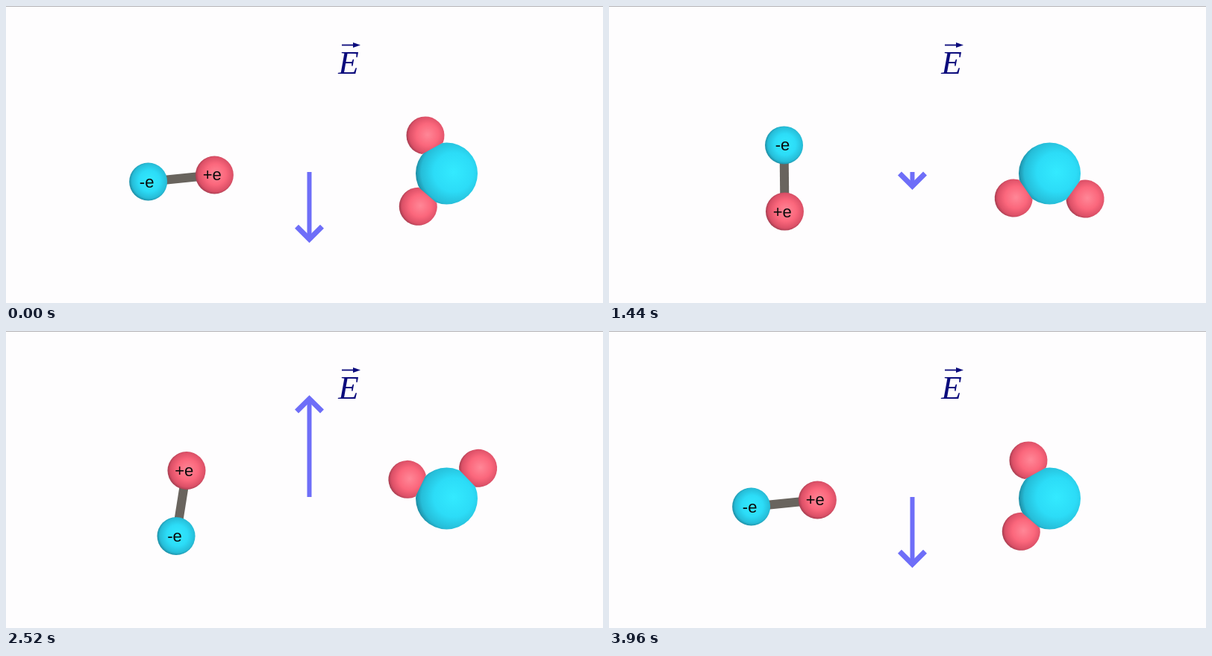
Write an HTML page with a canvas that moves like this. It is 800x399 px and loops after 4000 ms.

```html
<!DOCTYPE html>
<html lang="en">
<head>
<meta charset="utf-8">
<title>Dipoles in an alternating field</title>
<style>
  html, body { margin: 0; width: 100%; height: 100%; overflow: hidden; background: #fefdfe; }
  canvas { display: block; }
</style>
</head>
<body>
<canvas id="stage" width="800" height="399"></canvas>
<script>
const ctx = document.getElementById('stage').getContext('2d');
const LOOP = 4000, STEP = 40, HALF = 1980;   // the field reverses every HALF ms
const RAD = Math.PI / 180;

const BLUE = ['#33eaff', '#2cdcf7', '#26bdd8', '#1b7f95'];
const RED = ['#ff8797', '#fb677c', '#dc5067', '#96384a'];

// Dipole angle in degrees over half a cycle; the other half is its negative.
const swing = [[0, -5.8], [100, 17.2], [260, 51], [540, 81], [680, 85],
               [1000, 88.3], [1300, 89.8], [1440, 89.4], [1680, 66], [1940, 14.5]];
const shifted = ([t, a], by) => [t + by, -a];
const knots = [shifted(swing[swing.length - 1], -HALF), ...swing,
               shifted(swing[0], HALF), shifted(swing[1], HALF)];

function slope(i) {
  const [a, b, c] = [knots[i - 1], knots[i], knots[i + 1]];
  const h1 = b[0] - a[0], h2 = c[0] - b[0];
  return (h2 * (b[1] - a[1]) / h1 + h1 * (c[1] - b[1]) / h2) / (h1 + h2);
}

function dipoleAngle(t) {
  const phase = t % HALF;
  let i = 1;
  while (knots[i + 1][0] <= phase) i++;
  const [t0, a0] = knots[i], [t1, a1] = knots[i + 1];
  const h = t1 - t0, u = (phase - t0) / h, v = 1 - u;
  const angle = a0 * v * v * (1 + 2 * u) + a1 * u * u * (3 - 2 * u)
    + h * u * v * (slope(i) * v - slope(i + 1) * u);
  return (t % (2 * HALF) < HALF ? angle : -angle) * RAD;
}

// A sphere lit from an offset point; "from" and "to" cut off a cap.
function sphere(x, y, r, colors, light, from = 0, to = 2 * Math.PI) {
  const lx = x + light * r, ly = y - 0.04 * r;
  const shade = ctx.createRadialGradient(lx, ly, 0, lx, ly, r * (1.05 + light));
  [0, 0.5, 0.82, 1].forEach((stop, i) => shade.addColorStop(stop, colors[i]));
  ctx.fillStyle = shade;
  ctx.beginPath();
  ctx.arc(x, y, r, from, to);
  ctx.fill();
}

function line(color, width, ...points) {
  ctx.strokeStyle = color;
  ctx.lineWidth = width;
  ctx.beginPath();
  points.forEach(([x, y]) => ctx.lineTo(x, y));
  ctx.stroke();
}

function label(text, x, y, font, color) {
  ctx.font = font;
  ctx.fillStyle = color;
  ctx.textAlign = 'center';
  ctx.fillText(text, x, y);
}

function drawDipole(angle) {
  const x = 235, y = 231.5;
  const dx = 44.6 * Math.cos(angle), dy = 44.6 * Math.sin(angle);
  const font = '22px "Liberation Sans", Arial, sans-serif';
  line('#69645e', 12, [x - dx, y - dy], [x + dx, y + dy]);
  sphere(x - dx, y - dy, 25.5, BLUE, 0.06);
  sphere(x + dx, y + dy, 25.5, RED, 0.06);
  label('-e', x - dx - 2, y - dy + 7.5, font, '#0a0a0a');
  label('+e', x + dx - 3.2, y + dy + 7.5, font, '#0a0a0a');
}

function drawWater(angle) {
  const x = 590.5, y = 225, reach = 58.5, cap = 141 * RAD;
  sphere(x, y, 41.5, BLUE, 0.22);
  for (const side of [-55, 55]) {
    const a = Math.PI - angle + side * RAD;
    sphere(x + reach * Math.cos(a), y + reach * Math.sin(a), 25.5, RED, 0.12, a - cap, a + cap);
  }
}

function drawField(t) {
  const x = 406.5, y = 223, color = '#6e6ef8';
  const field = Math.cos((t - 518) * Math.PI / HALF);
  const dir = Math.sign(field) || 1;
  const tip = Math.max(131 * Math.abs(field) + 6, 24) - 5;
  const at = (dx, d) => [x + dx, y + dir * d];
  line(color, 6, at(0, 0), at(0, tip));
  line(color, 7, at(-17, tip - 17), at(0, tip), at(17, tip - 17));
}

function drawSymbol() {
  const navy = '#0b0b7c';
  label('E', 459, 91, 'italic 45px "Liberation Serif", "Times New Roman", serif', navy);
  line(navy, 1.8, [450, 52.5], [468, 52.5]);
  ctx.fillStyle = navy;
  ctx.beginPath();
  ctx.moveTo(475, 52.5);
  ctx.lineTo(465, 49);
  ctx.lineTo(465, 56);
  ctx.fill();
}

function draw(now) {
  const t = Math.floor(now % LOOP / STEP) * STEP;
  ctx.fillStyle = '#fefdfe';
  ctx.fillRect(0, 0, 800, 399);
  ctx.fillStyle = '#b4b3b6';
  ctx.fillRect(0, 0, 800, 1);
  const angle = dipoleAngle(t);
  drawSymbol();
  drawField(t);
  drawDipole(angle);
  drawWater(angle);
}

const start = performance.now();
function tick() {
  draw(performance.now() - start);
  requestAnimationFrame(tick);
}
tick();
</script>
</body>
</html>
```
